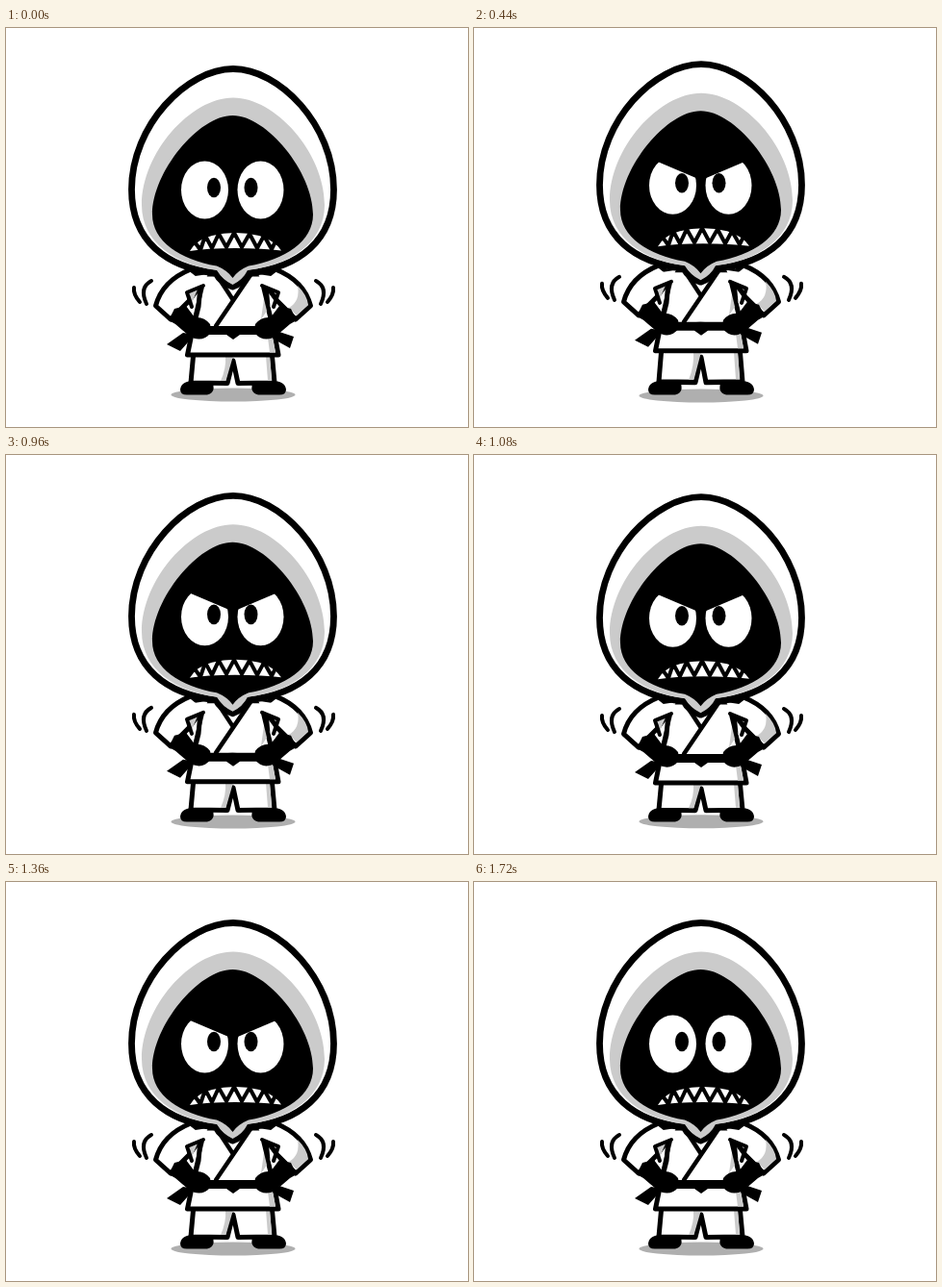
An HTML page that plays this animation: 480x415 px, repeating every 1.92 s.

```html
<!DOCTYPE html>
<html lang="en">
<head>
<meta charset="utf-8">
<title>Angry little fighter</title>
<style>
  html, body { margin: 0; width: 100%; height: 100%; overflow: hidden; background: #fff; }
  svg { display: block; width: 100%; height: 100%; }
  .line { fill: none; stroke: #000; stroke-linecap: round; stroke-linejoin: round; }
  .cloth { fill: #fff; stroke: #000; stroke-width: 5; stroke-linejoin: round; }
  .shade { fill: #cbcbcb; }
</style>
</head>
<body>
<svg viewBox="0 0 480 415">
  <defs>
    <path id="arm" class="cloth" stroke-width="6" d="M192 251 C177 257 161 268 155.500 289 L171 303 L190 284 L206 262 Z"/>
    <g id="hand">
      <path d="M169 304 L175 292 L187 289 L196 301 Q206 300 212 308 Q215 318 207 322 Q199 326 190 320 L176 308 Z"/>
      <path class="line" stroke-width="4" d="M205 268 L188 275 L193 290 M204 269 L196 302"/>
    </g>
    <g id="marks" class="line" stroke-width="4">
      <path d="M151 263 Q138 270 146 287"/>
      <path d="M133 270 Q132 277 139 285"/>
    </g>
  </defs>

  <ellipse id="shadow" cx="236" cy="381.500" rx="64.500" ry="7" fill="#afafaf"/>

  <g id="legs">
    <path class="cloth" d="M195 336 L192 369 L230 369.500 L236 346 L241 369.500 L279 369 L276 336 Z"/>
    <path class="shade" d="M228 341 H236 L228.500 367 H223 Q229 354 228 341 Z M270 341 H274 L276 366.500 H272 Z"/>
  </g>
  <path d="M181 376 Q182 367 196 367 H214 Q219 379 209 381.500 H189 Q181 382 181 376 Z"/>
  <path d="M291 376 Q290 367 276 367 H257 Q252 379 262 381.500 H283 Q291 382 291 376 Z"/>

  <g id="torso">
    <use href="#arm"/>
    <use href="#arm" transform="matrix(-1 0 0 1 472 0)"/>
    <path class="shade" d="M303 268 Q313 278 314 288 L302 299 L294 291 Q306 284 303 268 Z"/>
    <path class="cloth" d="M203 256 L200 290 L193 318 L188.500 340 H283 L279 318 L272 290 L269 256 Z"/>
    <path fill="#fff" d="M190 259 L210 256 L204 268 L192 272 Z M282 259 L262 256 L268 268 L280 272 Z"/>
    <path class="shade" d="M269 274 L274 290 L265 303 Z M272 322 H277 L280 337.500 H274 Z M190 275 L199 272 L193 286 Z"/>
    <path class="line" stroke-width="4.500" d="M219 257 L236 283 M254 257 L218 310"/>
    <path d="M200 310 H270 V319 H200 Z"/>
    <path d="M226 311 Q235 309 245 311 L243 319 L236 324 L229 319 Z"/>
    <path d="M184 317 L167 329 L181 336 L196 319 Z M281 315 L299 321 L295 333 L277 323 Z"/>
    <use href="#hand"/>
    <use href="#hand" transform="matrix(-1 0 0 1 471 0)"/>
    <use href="#marks"/>
    <use href="#marks" transform="matrix(-1 0 0 1 473 0)"/>
  </g>

  <g id="head">
    <path fill="#fff" stroke="#000" stroke-width="6.800" stroke-linejoin="round"
      d="M236 42.500 C188 42.500 130.500 101 130.500 168 C130.500 222 167 249 218 255 Q223 265 235.500 269 Q247 265 252 255 C304 249 340.500 222 340.500 168 C340.500 101 284 42.500 236 42.500 Z"/>
    <path class="shade" d="M236 72.500 C192 72.500 141 130 141 184 C141 224 177 246 219 252 Q225 262 235.500 267 Q246 262 251 252 C295 246 331 224 331 184 C331 130 280 72.500 236 72.500 Z"/>
    <path d="M235.500 91 C200 91 152 150 152 194 C152 222 181 241 219 247.500 Q230 252 235.500 260 Q241 252 252 247.500 C290 241 319 222 319 194 C319 150 271 91 235.500 91 Z"/>
    <g fill="#fff">
      <ellipse cx="206.500" cy="168.500" rx="24.500" ry="30"/>
      <ellipse cx="264.500" cy="168.500" rx="24" ry="30"/>
    </g>
    <ellipse cx="216" cy="166" rx="7" ry="10.300"/>
    <ellipse cx="254.500" cy="166" rx="7" ry="10.300"/>
    <path id="lids"/>
    <path fill="#fff" d="M191 232 Q198 220 214 216 Q238 210 263 216 Q279 221 286 231.500 Q268 229 238 229 Q208 229 191 232 Z"/>
    <path class="line" stroke-width="4" d="M195 221 L202 231 L207 216 L214 229 L221 214 L229 228 L237 213 L245 228 L253 214 L261 229 L268 216 L276 230 L281 220"/>
  </g>
</svg>
<script>
const LOOP = 1920, STEP = 40, RELAX = 1720;
const [head, torso, legs, lids, shadow] =
  ['head', 'torso', 'legs', 'lids', 'shadow'].map(id => document.getElementById(id));

// [time, value] keys
const lift = [[0, 0], [200, -5], [440, -4.8], [720, -4], [1080, 1.2], [1360, 0], [LOOP, 0]];
const frown = [[0, 0], [180, 1], [LOOP, 1]];
const squint = [[0, 0], [140, 0], [420, 1], [LOOP, 1]];

function at(keys, t) {
  const i = Math.max(1, keys.findIndex(k => k[0] >= t));
  const [t0, a] = keys[i - 1], [t1, b] = keys[i];
  const u = (t - t0) / (t1 - t0);
  return a + (b - a) * u * u * (3 - 2 * u);
}

function lidPath(t) {
  const f = t >= RELAX ? 0 : at(frown, t);
  if (!f) return '';
  const s = at(squint, t);
  const outer = 134 + 4 * f + 8 * s;
  const inner = 138 + 21 * f + 4 * s;
  const edge = outer - (inner - outer) * 0.4;
  return `M180 130 V${edge} L196 ${outer} L236 ${inner} L276 ${outer} L292 ${edge} V130 Z`;
}

const shift = (part, y) => part.setAttribute('transform', `translate(0 ${y})`);

function draw(t) {
  const y = at(lift, t), hip = y * 0.87;
  const k = 1 - hip / 38;
  shift(head, y);
  shift(torso, hip);
  shift(shadow, -0.2 * y);
  legs.setAttribute('transform', `matrix(1 0 0 ${k} 0 ${378 * (1 - k)})`);
  lids.setAttribute('d', lidPath(t));
}

const start = performance.now();
function tick() {
  const t = (performance.now() - start) % LOOP;
  draw(Math.floor(t / STEP) * STEP);
  requestAnimationFrame(tick);
}
tick();
</script>
</body>
</html>
```
